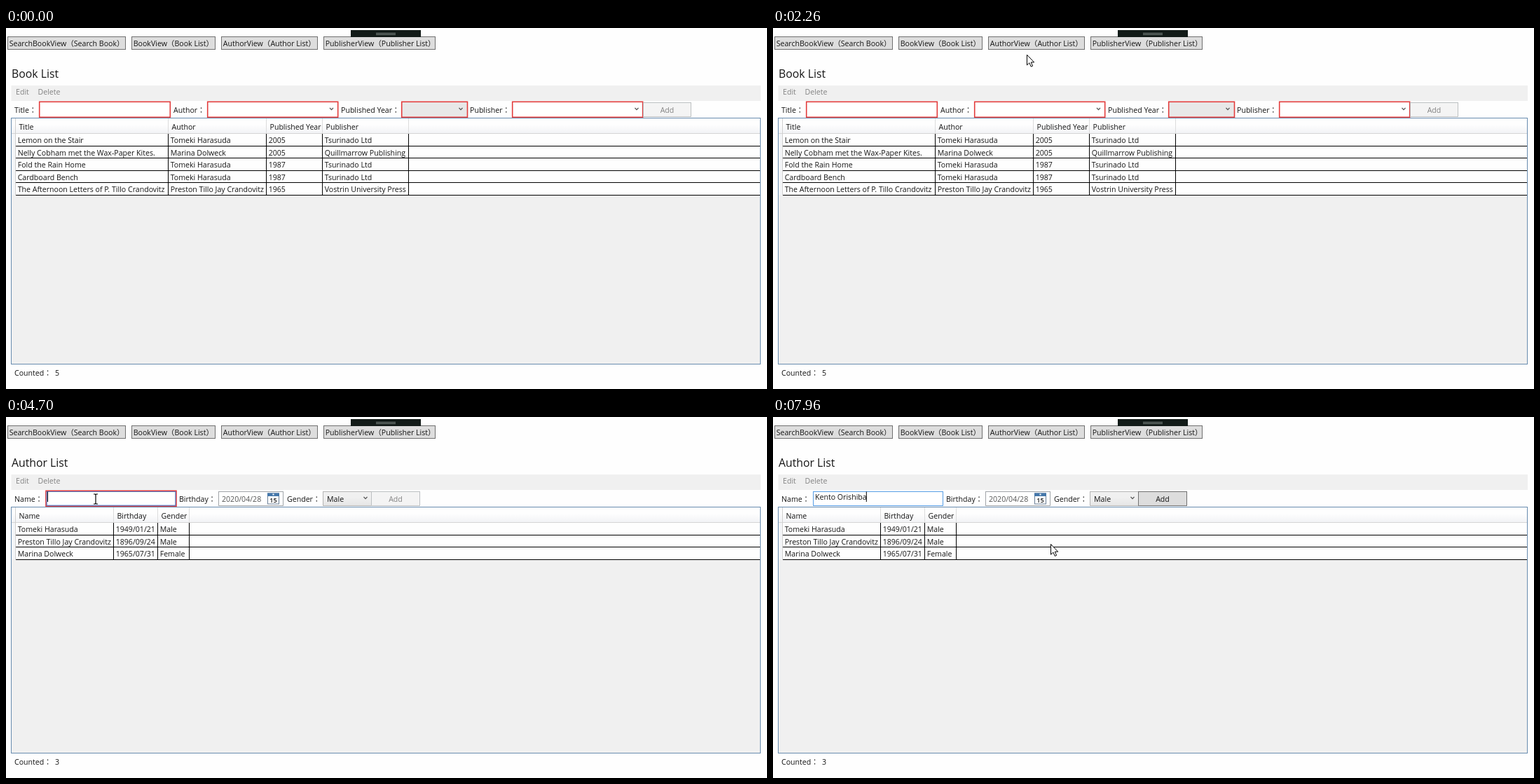
Animation, 1086 px wide and 515 px high, one loop 8 s. Source, as an HTML page:

```html
<!DOCTYPE html>
<html lang="en">
<head>
<meta charset="utf-8">
<title>Library lists</title>
<style>
  html, body { margin: 0; width: 100%; height: 100%; overflow: hidden; background: #fefefe; }
  svg { display: block; width: 100%; height: 100%; }
  text { font: 10.6px 'Open Sans', 'Noto Sans CJK JP', 'Noto Sans CJK', sans-serif; fill: #151515; white-space: pre; }
  .heading { font-size: 15.8px; }
  .dim { fill: #838383; }
  .date { fill: #555; }
</style>
</head>
<body>
<svg id="stage" viewBox="0 0 1086 515"></svg>
<script>
const LOOP = 8000;
const RED = '#e23c3c', BLUE = '#569de5';

const rect = (x1, y1, x2, y2, fill, stroke = 'none', extra = '') =>
  `<rect x="${x1}" y="${y1}" width="${x2 - x1}" height="${y2 - y1}" fill="${fill}" stroke="${stroke}" ${extra}/>`;
const text = (x, y, s, cls = '') => `<text x="${x}" y="${y}" class="${cls}">${s}</text>`;
const line = (x1, y1, x2, y2, color = '#000', width = 1) =>
  `<path d="M${x1} ${y1}L${x2} ${y2}" stroke="${color}" stroke-width="${width}"/>`;
const group = (id, content) => `<g id="${id}">${content}</g>`;

const label = (x, s) => text(x, 121, s + '：');
const chevron = x => `<path d="M${x - 2.5} 114l2.5 2.7 2.5-2.7" fill="none" stroke="#555" stroke-width="1.2"/>`;
const required = (x1, x2, fill = '#fff') => rect(x1, 105.3, x2, 127.3, fill, RED, 'stroke-width="1.6"');

function navButton(id, x1, x2, s) {
  return group(id, rect(x1, 12.5, x2, 30.5, '#ddd', '#707070') + text(x1 + 2.2, 25.5, s));
}

function addButton(id, x1, x2, enabled) {
  const colors = enabled ? ['#ddd', '#707070'] : ['#f4f4f4', '#bcc0c2'];
  return group(id, rect(x1, 106.5, x2, 126.5, ...colors) +
    `<text x="${(x1 + x2) / 2}" y="120.5" text-anchor="middle" class="${enabled ? '' : 'dim'}">Add</text>`);
}

// edges: column borders from left to right; rows: cell texts
function table(edges, headers, rows) {
  const top = 150.7, pitch = 17.5, bottom = top + pitch * rows.length;
  let out = rect(8, 129, 1076, 151, 'url(#header)') + line(8, 150.5, 1076, 150.5, '#d5d5d5') +
    rect(8, 151, 13, bottom, '#f5f6f8') + rect(13, 151, 1076, bottom, '#fefefe') +
    line(13.5, 129, 13.5, bottom, '#d0d0d0');
  headers.forEach((s, i) => out += text(edges[i] + 5, 145, s));
  edges.slice(1).forEach(x => out += line(x, 129, x, 150, '#dcdcdc') + line(x, 151, x, bottom));
  rows.forEach((cells, r) => {
    const y = top + pitch * r, rule = Math.floor(y + pitch) + .5;
    cells.forEach((s, i) => out += text(edges[i] + 3.2, y + 13.3, s));
    out += line(14, rule, 1076, rule);
  });
  return out;
}

function page(id, heading, form, grid, count) {
  return group(id, text(8, 71, heading, 'heading') + form + grid +
    rect(7.5, 128.5, 1076.5, 479.5, 'none', '#688caf') + text(70, 496, count));
}

const TOMEKI = 'Tomeki Harasuda', PRESTON = 'Preston Tillo Jay Crandovitz', MARINA = 'Marina Dolweck';
const HOUSE = 'Tsurinado Ltd';

const bookForm =
  label(12, 'Title') + required(47.7, 234.3) +
  label(239, 'Author') + required(287.7, 473.7) + chevron(464.5) +
  label(478, 'Published Year') + required(564.7, 658.5, '#e8e8e8') + chevron(649) +
  label(662, 'Publisher') + required(722.7, 908.7) + chevron(900) +
  addButton('bookAdd', 909.5, 977.5, false);

const bookGrid = table([13.5, 231.5, 371.5, 451.5, 574.5], ['Title', 'Author', 'Published Year', 'Publisher'], [
  ['Lemon on the Stair', TOMEKI, '2005', HOUSE],
  ['Nelly Cobham met the Wax-Paper Kites.', MARINA, '2005', 'Quillmarrow Publishing'],
  ['Fold the Rain Home', TOMEKI, '1987', HOUSE],
  ['Cardboard Bench', TOMEKI, '1987', HOUSE],
  ['The Afternoon Letters of P. Tillo Crandovitz', PRESTON, '1965', 'Vostrin University Press']
]);

const calendarIcon = rect(373.5, 109, 389.5, 124, '#fff', '#6b7f96') +
  rect(373, 108.5, 390, 113, '#4477aa') + rect(380.5, 109.5, 382.5, 111.5, '#fff') +
  '<text x="381.5" y="122" text-anchor="middle" style="font-size:9px;font-weight:600">15</text>';

const authorForm =
  label(12, 'Name') +
  group('focusBorder', rect(57.5, 106.5, 242.5, 126.5, '#fff', BLUE)) +
  group('errorBorder', required(57, 243, 'none')) +
  group('errorFocus', rect(58.2, 106.5, 241.8, 126.1, 'none', '#4a7fd0')) +
  group('typed', text(60, 118, 'Kento Orishiba')) +
  group('caret', line(0, 106.5, 0, 121)) +
  label(247, 'Birthday') + rect(303.5, 106.5, 395.5, 126.5, '#fff', '#a0a4a8') +
  text(308, 120.5, '2020/04/28', 'date') + calendarIcon +
  label(401, 'Gender') + rect(452.5, 106.5, 521.5, 126.5, 'url(#combo)', '#b4b4b4') +
  text(458, 120.5, 'Male') + chevron(513) +
  addButton('addOff', 521.5, 590.5, false) + addButton('addOn', 521.5, 590.5, true);

const authorGrid = table([13.5, 153.5, 216.5, 261.5], ['Name', 'Birthday', 'Gender'], [
  [TOMEKI, '1949/01/21', 'Male'],
  [PRESTON, '1896/09/24', 'Male'],
  [MARINA, '1965/07/31', 'Female']
]);

const gradient = (id, from, to) => `<linearGradient id="${id}" x2="0" y2="1">
  <stop offset=".4" stop-color="${from}"/><stop offset="1" stop-color="${to}"/></linearGradient>`;

document.getElementById('stage').innerHTML =
  `<defs>${gradient('header', '#fefefe', '#f1f2f5')}${gradient('combo', '#f0f0f0', '#e6e6e6')}</defs>` +
  navButton('navSearch', 2.5, 170.5, 'SearchBookView（Search Book）') +
  navButton('navBook', 179.5, 298.5, 'BookView（Book List）') +
  navButton('navAuthor', 307.5, 444.5, 'AuthorView（Author List）') +
  navButton('navPublisher', 453.5, 612.5, 'PublisherView（Publisher List）') +
  rect(492, 3, 592, 13, '#121b18') + line(528, 7.5, 556, 7.5, '#78827e') + line(528, 9.5, 556, 9.5, '#78827e') +
  rect(7.5, 82, 1077, 104, '#f0f0f0') + text(14, 94.5, 'Edit', 'dim') + text(45.5, 94.5, 'Delete', 'dim') +
  rect(8, 129, 1076, 479, '#f0f0f0') +
  page('books', 'Book List', bookForm, bookGrid, 5) +
  page('authors', 'Author List', authorForm, authorGrid, 3) +
  text(12, 496, 'Counted：') +
  group('arrow', '<path d="M.5 .5V15.2L3.9 12l2.4 5.4 2.3-1-2.3-5.2h4.4z" fill="#fff" stroke="#000"/>') +
  group('beam', '<path d="M-3-7h2.2L0-6.2.8-7H3M0-6.2V6.2M-3 7h2.2L0 6.2.8 7H3" fill="none" stroke="#000" stroke-width="1.2"/>');

const el = id => document.getElementById(id);
const show = (id, on) => el(id).style.display = on ? '' : 'none';
const within = (t, ...spans) => spans.some(([a, b]) => t >= a && t < b);

// Pointer stops: time, x, y. The pointer is hidden outside each track.
const tracks = [
  [[160, 568, 460], [330, 505, 386], [1060, 505, 386], [1700, 377, 87], [1860, 360, 67],
   [1900, 360, 67], [2500, 363, 22], [2660, 363, 22], [2700, 363, 20], [4430, 363, 20],
   [4670, 128, 117], [5400, 128, 117]],
  [[6500, 930, 215], [6600, 1058, 254], [6660, 875, 254], [7530, 875, 254],
   [7660, 760, 265], [7960, 396, 181], [LOOP, 396, 181]]
];

function pointerAt(t) {
  const track = tracks.find(k => t >= k[0][0] && t < k[k.length - 1][0]);
  if (!track) return null;
  const i = track.findIndex(k => k[0] > t);
  const [t0, x0, y0] = track[i - 1], [t1, x1, y1] = track[i];
  const u = (t - t0) / (t1 - t0), e = u * u * (3 - 2 * u);
  return { x: x0 + (x1 - x0) * e, y: y0 + (y1 - y0) * e };
}

function draw(t) {
  const onAuthors = t >= 3760, focused = t >= 4640, filled = t >= 5400;
  show('books', !onAuthors);
  show('authors', onAuthors);
  show('errorBorder', !filled);
  show('errorFocus', focused && !filled);
  show('typed', filled);
  show('addOff', !filled);
  show('addOn', filled);
  show('caret', within(t, [4640, 5100], [5400, 6030], [6460, 7000], [7530, LOOP]));
  el('caret').setAttribute('transform', `translate(${filled ? 133.3 : 59.5})`);

  const p = pointerAt(t);
  const inField = p && onAuthors && p.x > 57 && p.x < 243 && p.y > 105 && p.y < 128;
  show('arrow', p && !inField);
  show('beam', inField);
  if (p) el(inField ? 'beam' : 'arrow').setAttribute('transform', `translate(${p.x} ${p.y})`);

  const hover = p && p.x > 307 && p.x < 445 && p.y > 12 && p.y < 31;
  const pressed = within(t, [3400, 3500]);
  const face = el('navAuthor').firstChild;
  face.setAttribute('fill', pressed ? '#c4e5f6' : hover ? '#bee6fd' : '#ddd');
  face.setAttribute('stroke', pressed ? '#2c628b' : hover ? '#3c7fb1' : '#707070');
}

const start = performance.now();
function tick() {
  draw((performance.now() - start) % LOOP);
  requestAnimationFrame(tick);
}
tick();
</script>
</body>
</html>
```
